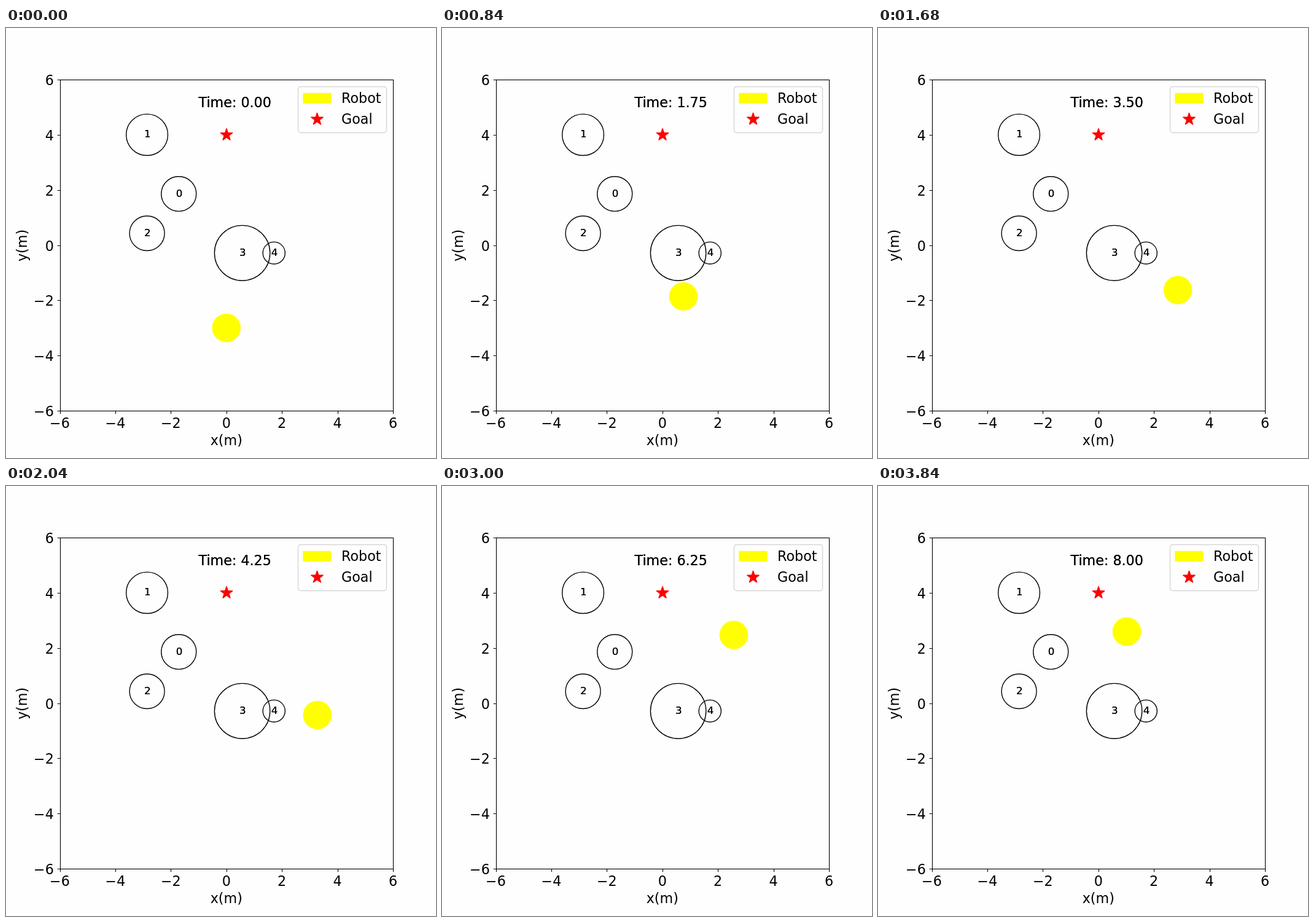
These frames come from a looping animation (700x700 px, 3.96 s). An HTML page:

```html
<!DOCTYPE html>
<html lang="en">
<head>
<meta charset="utf-8">
<title>Robot path</title>
<style>
  html, body { margin: 0; width: 100%; height: 100%; overflow: hidden; background: #fefefe; }
  svg { display: block; width: 700px; height: 700px; }
  text { font-family: "DejaVu Sans", sans-serif; font-size: 22.22px; fill: #000; white-space: pre; }
  .small { font-size: 16.67px; }
  .axis { fill: none; stroke: #000; stroke-width: 1.11; }
  .ring { fill: none; stroke: #000; stroke-width: 1.39; }
  .robot { fill: #ff0; stroke: #ff0; stroke-width: 1.39; }
  .star { fill: #f00; stroke: #f00; stroke-width: 1.39; stroke-linejoin: bevel; }
  .legend { fill: #fefefe; stroke: #d5d5d5; stroke-width: 1.39; }
</style>
</head>
<body>
<svg id="stage" viewBox="0 0 700 700"></svg>
<script>
const stage = document.getElementById('stage');
const SX = 542.5 / 12, SY = 539 / 12;
const px = x => 358.75 + x * SX;
const py = y => 353.5 - y * SY;
const snap = v => Math.floor(v + 0.5) + 0.5;

function add(tag, attrs, text) {
  const el = document.createElementNS('http://www.w3.org/2000/svg', tag);
  for (const k in attrs) el.setAttribute(k, attrs[k]);
  if (text !== undefined) el.textContent = text;
  stage.appendChild(el);
  return el;
}

const label = (x, y, text, anchor = 'start', cls = '') =>
  add('text', { x, y, 'text-anchor': anchor, class: cls }, text);

const disc = (x, y, r, cls) =>
  add('ellipse', { cx: x, cy: y, rx: r * SX, ry: r * SY, class: cls });

function star(cx, cy) {
  const pts = [];
  for (let i = 0; i < 10; i++) {
    const r = i % 2 ? 3.98 : 10.42, a = i * Math.PI / 5;
    pts.push((cx + r * Math.sin(a)).toFixed(2) + ',' + (cy - r * Math.cos(a)).toFixed(2));
  }
  add('polygon', { points: pts.join(' '), class: 'star' });
}

// Robot waypoints: step, x, y
const way = [
  [0, 358.75, 488.25], [5, 379.8, 442.3], [7, 393, 437], [10, 420.3, 441.5],
  [11, 436.6, 445.2], [15, 499.3, 412.4], [17, 506.9, 372.9], [20, 507.3, 315.4],
  [21, 512.7, 296], [25, 475, 242.5], [30, 433.2, 239.4], [32, 405, 237]
];
const last = way.length - 1;

const rate = (i, c) => (way[i + 1][c] - way[i][c]) / (way[i + 1][0] - way[i][0]);

function slope(i, c) {
  if (i === 0) return 1.5 * rate(0, c) - 0.5 * slope(1, c);
  if (i === last) return rate(i - 1, c);
  const a = way[i][0] - way[i - 1][0], b = way[i + 1][0] - way[i][0];
  return (rate(i - 1, c) * b + rate(i, c) * a) / (a + b);
}

function along(n, c) {
  let i = 0;
  while (i < last - 1 && n >= way[i + 1][0]) i++;
  const p = way[i], q = way[i + 1], d = q[0] - p[0], s = (n - p[0]) / d, u = 1 - s;
  return p[c] * (1 + 2 * s) * u * u + q[c] * s * s * (3 - 2 * s)
    + d * s * u * (u * slope(i, c) - s * slope(i + 1, c));
}

// Obstacles: centre in sevenths of a metre, radius in metres
const obstacles = [[-12, 13, 0.63], [-20, 28, 0.75], [-20, 3, 0.63], [4, -2, 1], [12, -2, 0.4]];

const robot = disc(358.75, 488.25, 0.5, 'robot');
obstacles.forEach(([x, y, r]) => disc(px(x / 7), py(y / 7), r, 'ring'));

add('rect', { x: 88.5, y: 84.5, width: 542, height: 539, class: 'axis' });
for (let v = -6; v <= 6; v += 2) {
  const x = snap(px(v)), y = snap(py(v)), name = String(v).replace('-', '\u2212');
  add('path', { d: `M${x} 623.5v4.86M88.5 ${y}h-4.86`, class: 'axis' });
  label(px(v), 651, name, 'middle');
  label(77.8, y + 8, name, 'end');
}
label(358.75, 679, 'x(m)', 'middle');
label(0, 0, 'y(m)', 'middle').setAttribute('transform', 'translate(34 354) rotate(-90)');

star(359, 174);

// Overlaid text pairs give the slightly heavier strokes
obstacles.forEach(([x, y], i) => {
  for (let k = 0; k < 2; k++) label(px(x / 7 - 0.1), py(y / 7 - 0.1), i, 'start', 'small');
});
const clocks = [0, 1].map(() => label(313.5, 129, ''));

add('rect', { x: 475.5, y: 95.5, width: 144, height: 75, rx: 4.4, class: 'legend' });
add('rect', { x: 484, y: 106.5, width: 44.6, height: 15.6, class: 'robot' });
star(506.5, 148.5);
label(546, 122, 'Robot');
label(546, 156, 'Goal');

function draw(ms) {
  const n = Math.floor(ms % 3960 / 120);
  robot.setAttribute('cx', along(n, 1).toFixed(2));
  robot.setAttribute('cy', along(n, 2).toFixed(2));
  const text = 'Time: ' + (n / 4).toFixed(2);
  clocks.forEach(el => { if (el.textContent !== text) el.textContent = text; });
}

const start = performance.now();
function tick() {
  draw(performance.now() - start);
  requestAnimationFrame(tick);
}
tick();
</script>
</body>
</html>
```
